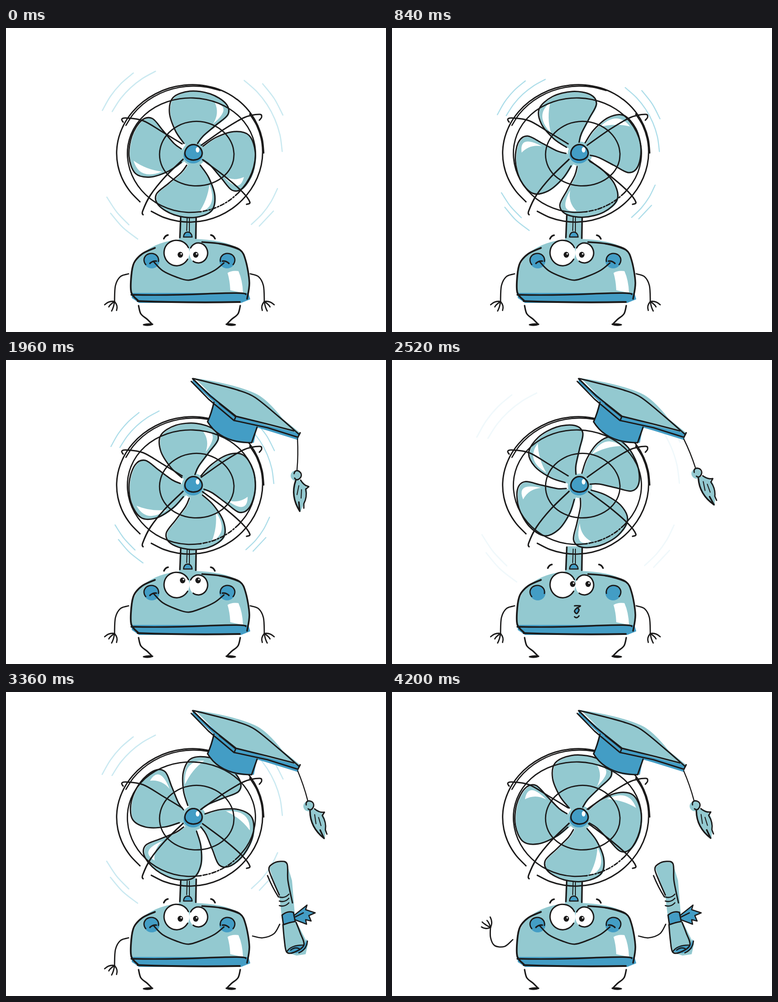
An HTML page for the animation above (4480 ms loop, 837 px wide and 669 px high).

```html
<!DOCTYPE html>
<html lang="en">
<head>
<meta charset="utf-8">
<title>Graduating fan</title>
<style>
html, body { margin: 0; width: 100%; height: 100%; overflow: hidden; background: #fff; }
svg { display: block; width: 100%; height: 100%; }
</style>
</head>
<body>
<svg id="stage" viewBox="0 0 837 669" stroke-linecap="round" stroke-linejoin="round"></svg>
<script>
const TEAL = '#93c9d0', BLUE = '#439dc5', INK = '#1b1a1a', PALE = '#acdde9';
const LOOP = 4480, STEP = 280, STEPS = LOOP / STEP;
const RAD = Math.PI / 180;

const fill = (d, color = TEAL) => `<path d="${d}" fill="${color}"/>`;
const ink = (d, w = 3, color = INK, extra = '') =>
  `<path d="${d}" fill="none" stroke="${color}" stroke-width="${w}" ${extra}/>`;
const oval = (x, y, rx, ry, color) => `<ellipse cx="${x}" cy="${y}" rx="${rx}" ry="${ry}" fill="${color}"/>`;
const group = (transform, content) => `<g transform="${transform}">${content}</g>`;
const mirror = content => group('translate(808 0) scale(-1 1)', content);
const both = content => content + mirror(content);

// Smooth open path through a list of "x,y" points.
function curve(text) {
  const p = text.split(' ').map(s => s.split(',').map(Number));
  const at = i => p[Math.max(0, Math.min(p.length - 1, i))];
  let d = 'M' + p[0];
  for (let i = 0; i < p.length - 1; i++) {
    const [a, b, c, e] = [at(i - 1), at(i), at(i + 1), at(i + 2)];
    d += 'C' + b.map((v, k) => v + (c[k] - a[k]) / 6) + ' ' + c.map((v, k) => v - (e[k] - b[k]) / 6) + ' ' + c;
  }
  return d;
}

// Slightly uneven elliptical arc; angles in degrees, clockwise from the right.
function arc(x, y, rx, ry, from = 0, to = 360, wobble = .008) {
  const n = Math.ceil((to - from) / 12), points = [];
  for (let i = 0; i <= n; i++) {
    const a = (from + (to - from) * i / n) * RAD, r = 1 + wobble * Math.sin(3 * a + rx);
    points.push((x + rx * r * Math.cos(a)).toFixed(1) + ',' + (y + ry * r * Math.sin(a)).toFixed(1));
  }
  return curve(points.join(' '));
}

// Value at a step from a few [step, value] keys.
function between(keys, step) {
  const i = Math.max(1, keys.findIndex(k => k[0] >= step));
  const [[s0, v0], [s1, v1]] = [keys[i - 1], keys[i]];
  return v0 + (v1 - v0) * (step - s0) / (s1 - s0);
}

// --- Fan head -------------------------------------------------------------
const spin = [[0, 0], [3, 68], [5, 162], [7, 257], [9, 323], [12, 378], [15, 446]];
const light = [[0, 135], [3, 315], [5, 405], [7, 495], [9, 675], [12, 675], [15, 765]];
const bladeEdge = curve('-18,-24 -37,-52 -50,-92 -42,-125 -5,-139 40,-133 74,-112 79,-88 52,-64 24,-40 12,-24');
const shineAhead = 'M50,-114Q90,-104 46,-67Q61,-90 50,-114Z';
const shineBehind = 'M-14,-129Q-58,-116 -38,-66Q-34,-101 -14,-129Z';

function blades(step) {
  const turn = between(spin, step), sun = between(light, step);
  const each = draw => [0, 90, 180, 270].map(a => group(`rotate(${turn + a})`, draw(turn + a))).join('');
  const shine = a => fill(Math.sin((sun - a) * RAD) > 0 ? shineAhead : shineBehind, '#fff');
  return group('translate(410 278)',
    group('translate(2 1)', each(() => fill(bladeEdge + 'L0,0Z')) + oval(2, -2, 27, 27, TEAL)) +
    each(shine) + each(() => ink(bladeEdge, 3)));
}

const neck = fill('M384,410H420V470H381Z') +
  ink('M385,412L383,461M419,412L418,463', 3.4) + ink('M399,416L398,446M404,416V448', 2) +
  `<path d="M391,460Q392,449 401,449Q409,450 410,460Z" fill="${BLUE}" stroke="${INK}" stroke-width="2.4"/>`;

const guard =
  ink(arc(407, 275, 162, 150, 134, 360)) + ink(arc(405, 276, 160, 150, 325, 482)) +
  ink(arc(411, 279, 161, 152, 205, 292), 2.6) +
  ink(arc(408, 279, 141, 126, 82, 402), 2.8) + ink(arc(408, 279, 141, 126, 42, 82), 3, INK, 'stroke-dasharray="9 4 3 4"') +
  ink(arc(420, 277, 82, 71), 2.8) +
  ink(curve('258,207 255,201 264,198 302,204 345,229 388,255')) +
  ink(curve('430,258 480,223 525,197 558,190 563,196 558,203')) +
  ink(curve('390,289 350,328 318,368 301,403 302,411'), 3.2) +
  ink(curve('433,290 480,325 520,360 537,383 530,388'), 3.2) +
  oval(412, 280, 21, 18, BLUE) + oval(413, 274, 19, 17, BLUE) + ink(arc(413, 274, 19, 17, 0, 360, .03), 3.2) +
  oval(422, 268, 4, 6, '#fff');

// --- Base and face --------------------------------------------------------
const base =
  fill('M275,590C273,540 277,505 322,482Q355,464 410,464Q490,466 518,490Q535,510 535,590Z') +
  fill('M277,583H534L538,597L518,605H293L277,594Z', BLUE) +
  fill('M488,539Q497,533 512,535Q521,555 522,583L494,577Q493,555 488,539Z', '#fff') +
  ink(curve('328,484 300,497 282,517 276,545 276,582 291,600'), 3.8) +
  ink(curve('432,471 480,476 515,488 528,512 536,560 531,596'), 3.6) + ink('M470,475Q500,481 518,490', 2.4) +
  ink('M276,587Q350,589 440,585T528,586', 3.4) + ink('M290,601Q400,605 515,603', 4);

const cheeks = both(oval(321, 513, 17, 16, BLUE) + ink(arc(320, 511, 16, 15, 140, 370), 2.8));
const smile = ink(curve('325,514 345,534 375,548 402,555 432,546 460,533 480,517'), 3) +
  both(ink('M317,518Q323,512 331,513', 3.4));
const whistle = oval(407, 552, 4, 6, BLUE) +
  ink(curve('402,541 415,541 406,547 402,553 407,558 412,550 408,545')) + ink('M402,565Q407,570 412,563');

function eyes(step, lift) {
  const [dx, dy] = step < 4 || step > 11 ? [0, 0] : step < 9 ? [5, -14] : [14, -6];
  const blink = step === 1, lid = blink ? TEAL : '#fff';
  const pupil = x => oval(x + dx, 499 + dy, 6, 6.5, INK) + oval(x + dx + 2, 497 + dy, 1.8, 1.8, '#fff');
  const brow = ink('M348,464Q351,457 357,456', 3.6);
  return oval(376, 495, 28, 28, lid) + ink(arc(376, 495, 28, 28, 30, 335), 3) +
    oval(424, 495, 20, 23, lid) + ink(arc(424, 495, 20, 22, -150, 125), 3) +
    (blink ? ink('M350,501Q376,520 402,502M407,502Q425,517 443,501') : pupil(384) + pupil(418)) +
    both(group(`translate(${-lift * .8} ${-lift})`, brow));
}

// --- Limbs ----------------------------------------------------------------
function hand(x, y, toward) {
  return [-45, -15, 15, 40].map((spread, i) => {
    const a = (toward + spread) * RAD, b = a + (i - 1.5) * .35, r = 20 + 3 * Math.sin(i * 2.5);
    return ink(`M${x},${y}Q${x + 12 * Math.cos(b)},${y + 12 * Math.sin(b)} ${x + r * Math.cos(a)},${y + r * Math.sin(a)}`, 2.8);
  }).join('');
}
const restArm = ink(curve('270,541 252,547 241,567 239,602'), 2.8) + hand(239, 602, 122);
const riseArm = ink(curve('269,543 248,556 228,565 213,570'), 2.8) + hand(213, 570, 180);
const waveArm = ink(curve('266,545 248,560 226,558 217,540 217,516'), 2.8) + hand(217, 518, 228);
const holdArm = ink(curve('543,537 565,541 590,532 603,511'), 2.6);
const legs = both(ink(curve('292,611 297,629 311,641 321,651'), 3.2) + ink('M303,653Q313,650 323,652Q313,656 303,653', 3));

// --- Props ----------------------------------------------------------------
const scroll =
  fill('M580,387L594,374L618,375L630,415L637,500L665,555L660,577L640,580L617,573L602,450Z') +
  fill('M608,490L634,483L637,505L611,512Z', BLUE) +
  fill('M634,492L662,469L660,479L682,486L667,493L672,504L661,501V511L636,500Z', BLUE) +
  fill('M619,571L637,557L656,559L663,543L661,565L640,575Z', BLUE) +
  ink(curve('602,447 588,415 579,390 586,379 602,373 619,378 621,415 631,464')) +
  ink('M576,404Q586,429 600,451', 2.8) +
  [0, 9, 19].map(y => ink(`M602,${451 + y}Q614,${455 + y} 623,${445 + y}`, 2.6)).join('') +
  ink('M608,491Q620,481 633,485L637,505Q624,507 611,512Z') +
  ink(curve('610,512 613,545 618,572 634,573 656,557 648,530 639,507')) +
  ink('M618,572Q628,556 656,557M627,568Q637,560 646,565M664,548Q662,567 645,574', 2.6) +
  ink('M634,492L663,469L660,479L681,486L667,492L672,504L660,501L662,511L636,501M637,495L655,486', 2.6);

const cap =
  fill('M457,93L505,130L553,146L546,182Q480,190 444,136Z', BLUE) +
  fill('M411,42L507,123L647,160L643,176L575,155L503,134L411,50Z', BLUE) +
  fill('M416,40Q500,52 548,73Q575,85 610,130L650,162L575,144L508,123L465,89Z') +
  ink(curve('413,41 462,53 510,66 548,82 600,124 646,164')) +
  ink('M411,41L450,79L507,124L580,142L634,156', 3.2) +
  ink('M408,47L446,86L502,133L576,149L643,170L648,160', 3) +
  ink('M458,93Q453,116 444,136Q472,182 541,182L553,148', 3.2) + ink('M470,96L506,125L503,132', 3);

const tassel = oval(638, 247, 11, 10, TEAL) + fill('M637,256H649Q672,270 658,300L648,320Q628,290 637,256Z') +
  ink('M642,173Q644,205 641,235', 2.4) + ink(arc(642, 246, 8, 9, 200, 500, .05), 2.8) +
  ink('M638,257Q626,288 647,318L645,300', 3.4) +
  ink('M649,256Q656,267 667,269L660,274Q664,290 656,303V312', 2.8) + ink('M645,267L641,285M651,275L650,292', 2);

function hat(step) {
  const left = Math.max(0, 6 - step), since = step - 7;
  const swing = left ? -172 : -20 + 20 * Math.cos(1.1 * since) * Math.exp(-.7 * Math.abs(since));
  return group(`translate(${22 * Math.sign(left)} ${-29 * left * left}) rotate(${8 * Math.sign(left)} 411 42)`,
    cap + group(`translate(643 172) rotate(${swing}) scale(1 ${left ? 1.3 : 1.1}) translate(-643 -172)`, tassel));
}

// --- Wind: each puff starts wide and shrinks: [step, size, shrink] ---------
const puffs = [[0, 1.11, .07], [2, 1.145, .145], [4, 1.23, .075], [9, 1.25, .046]];
function gustAt(step) {
  const [start, size, shrink] = puffs.filter(p => p[0] <= step).pop();
  return size - shrink * (step - start);
}
const streaks = [
  [198, 205, 233], [180, 207, 245], [176, 305, 359], [194, 315, 337],
  [193, 132, 153], [202, 123, 144], [181, 23, 51], [196, 36, 48]
].map(([r, from, to]) => ink(arc(413, 275, r, r, from, to), 2.4, PALE)).join('');
const wind = gust => gust < .99 ? '' :
  `<g opacity="${1 - (gust - 1) * 3.3}" transform="translate(413 275) scale(${gust}) translate(-413 -275)">${streaks}</g>`;

function scene(step) {
  const gust = gustAt(step), lift = Math.max(0, gust - 1.1) * 40;
  const landing = step === 6 ? 5 : 0, whistling = step === 9 || step === 10, holding = step > 9;
  const body = neck + blades(step) + guard + base + cheeks + (whistling ? whistle : smile) + eyes(step, lift) +
    (step < 13 ? restArm : step < 14 ? riseArm : waveArm) +
    (holding ? holdArm + group(step === 10 ? 'translate(-35 55)' : '', scroll) : mirror(restArm)) +
    (step > 3 ? hat(step) : '');
  return wind(gust) + group(`translate(0 657) scale(1 ${1 - landing / 50}) translate(0 -657)`, legs) +
    group(`translate(0 ${landing})`, body);
}

const stage = document.getElementById('stage');
const scenes = Array.from({ length: STEPS }, (_, step) => scene(step));
let shown = -1;
function tick() {
  const step = Math.floor(performance.now() % LOOP / STEP);
  if (step !== shown) stage.innerHTML = scenes[shown = step];
  requestAnimationFrame(tick);
}
tick();
</script>
</body>
</html>
```
